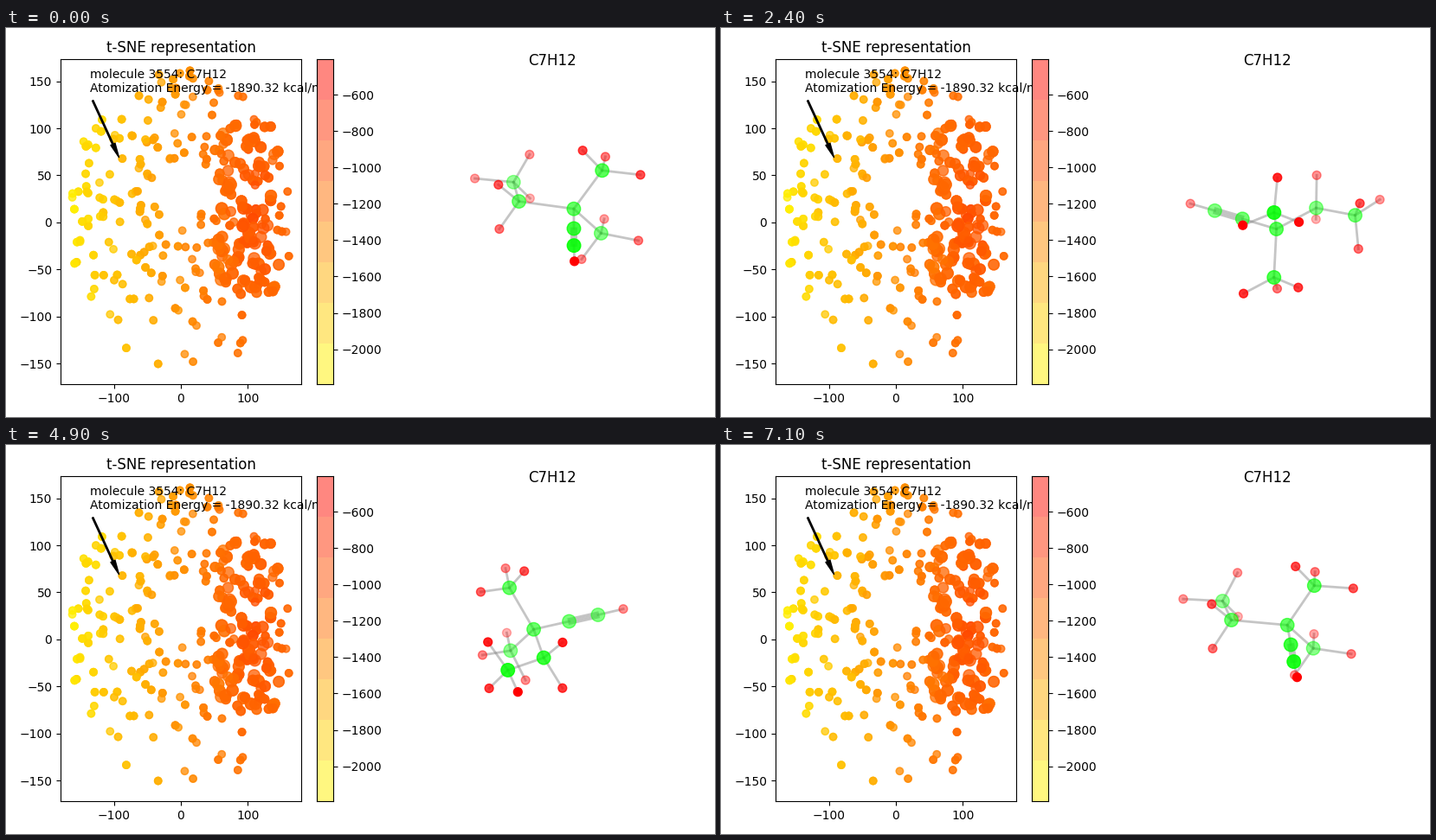
A matplotlib script for the animation above (7200 ms loop, 819 by 450 pixels).

```python
import numpy as np
import matplotlib.pyplot as plt
from matplotlib.animation import FuncAnimation

W, H, FRAMES = 819, 450, 72
plt.rcParams["font.family"] = "DejaVu Sans"
fig = plt.figure(figsize=(W / 100, H / 100), dpi=100, facecolor="white")


def add_axes(left, top, right, bottom):
    """Axes placed by stage pixels, measured from the top left corner."""
    return fig.add_axes(
        [left / W, 1 - bottom / H, (right - left) / W, (bottom - top) / H])


# ---- embedding scatter ----
ax = add_axes(63, 36, 341, 412)
LIMIT_X, LIMIT_Y = 179.4, 172.8
ax.set(xlim=(-LIMIT_X, LIMIT_X), ylim=(-LIMIT_Y + 0.8, LIMIT_Y + 0.8),
       xticks=[-100, 0, 100], yticks=range(-150, 151, 50))
ax.set_title("t-SNE representation")

rng = np.random.default_rng(12)


def crowded(x, y):
    return 55 < x < 145 and -70 < y < 100


def clump_centres(tries=1500):
    """Spaced random centres in an ellipse, packed closer on the right."""
    centres = []
    for _ in range(tries):
        x, y = rng.uniform(-165, 165), rng.uniform(-160, 160)
        dense = crowded(x, y)
        gap = 14 if dense else 19 + 8 * (y < -70)
        inside = np.hypot(x / 165, y / 162) < 1
        hollow = np.hypot(x / 48, (y - 32) / 30) < 1
        if inside and not hollow and all(
                np.hypot(x - a, y - b) > gap for a, b in centres):
            centres.append((x, y))
    return centres


dots = []
for x, y in clump_centres():
    dense = crowded(x, y)
    members = rng.integers(2, 5) if dense else rng.integers(1, 4)
    for dx, dy in rng.normal(0, 4.5, (members, 2)):
        size = rng.uniform(40, 95) if dense else 36
        dots += [(x + dx, y + dy, size)] * rng.integers(2, 6)

x, y, size = np.array(dots).T
dist = np.hypot(x - 112, 0.4 * (y - 10))
green = np.clip(80 + 0.55 * dist + rng.normal(0, 7, len(x)), 0, 255) / 255
ax.scatter(x, y, s=size, alpha=0.5,
           c=np.column_stack([np.ones_like(x), green, 0 * x]))

for dy, label in enumerate(["molecule 3554: C7H12",
                            "Atomization Energy = -1890.32 kcal/mol"]):
    ax.annotate(label, (34, 354 - 16 * dy), xycoords="axes pixels", zorder=5)
ax.annotate("", xy=(-92.3, 69.2), xytext=(-131.4, 129.5), zorder=6,
            arrowprops=dict(facecolor="black", width=1, headwidth=4,
                            headlength=12))

# ---- colour bar ----
bar = add_axes(359, 36, 378, 412)
level = (np.arange(8) + 0.5) / 8
bands = np.column_stack([np.ones(8), 1 - level, np.zeros(8)])[:, None, :]
bar.imshow(bands, origin="lower", aspect="auto", alpha=0.5,
           extent=(0, 1, -2192, -405), interpolation="nearest")
bar.set(xticks=[], yticks=range(-2000, -599, 200))
bar.yaxis.tick_right()

# ---- rotating molecule, positions in stage pixels around the pivot ----
stage = add_axes(0, 0, W, H)
stage.set(xlim=(0, W), ylim=(H, 0))
stage.axis("off")
stage.text(631, 43, "C7H12", fontsize=12, ha="center")

CX, CY, EYE = 635.4, 218.6, 1760
ELEV = np.radians(30)


def mirror(x, y, z):
    return [(x, y, z), (x, y, -z)]


CORE, INNER, TIP, CH2, END, UP, DOWN = range(7)
carbons = [(-19, 20.7, 0), (26.4, 20.3, 0), (64, 20, 0),
           (-35.6, -43.6, 0.6), (-82.8, -51.1, 0.6),
           *mirror(-34.7, 53.5, 42.4)]
# hydrogens come in order of their parents
hydrogens = [(97.6, 20.2, 0), (-91.3, -98, 1),
             *mirror(-97.9, -31.8, 30.2), *mirror(-23.2, -66.8, 29.8),
             *mirror(-20.7, 97.3, 44.2), *mirror(-25.8, 30.5, 73.2),
             *mirror(-68.8, 58.2, 42.5)]
parents = [TIP] + [END] * 3 + [CH2] * 2 + [UP, DOWN] * 3
atoms = np.array(carbons + hydrogens)
n_c, n_h = len(carbons), len(hydrogens)
sizes = np.array([125] * n_c + [50] * n_h)
colors = np.array([(0, 1, 0, 1)] * n_c + [(1, 0, 0, 1)] * n_h, dtype=float)

bonds = [(CORE, a) for a in (INNER, CH2, UP, DOWN)] + [(CH2, END)]
bonds += [(p, n_c + i) for i, p in enumerate(parents)]
strands = [(a, b, 0) for a, b in bonds]
strands += [(INNER, TIP, k) for k in (-2.6, 0, 2.6)]  # triple bond
lines = [stage.plot([], [], color="gray", alpha=0.45, lw=2, zorder=1)[0]
         for _ in strands]
balls = stage.scatter(np.zeros(n_c + n_h), np.zeros(n_c + n_h), s=sizes,
                      c=colors, zorder=2)


def project(azim):
    x, y, z = atoms.T
    side = y * np.cos(azim) - x * np.sin(azim)
    front = x * np.cos(azim) + y * np.sin(azim)
    depth = front * np.cos(ELEV) + z * np.sin(ELEV)
    rise = z * np.cos(ELEV) - front * np.sin(ELEV)
    zoom = 1 / (1 - depth / EYE)
    return np.column_stack([CX + side * zoom, CY - rise * zoom]), depth


def update(frame):
    pos, depth = project(2 * np.pi * frame / FRAMES)
    for line, (a, b, shift) in zip(lines, strands):
        dx, dy = pos[b] - pos[a]
        off = shift * np.array([-dy, dx]) / np.hypot(dx, dy)
        line.set_data(*(pos[[a, b]] + off).T)
    # far atoms are paler and drawn first
    rgba = colors.copy()
    rgba[:, 3] = 0.3 + 0.7 * (depth - depth.min()) / np.ptp(depth)
    order = np.argsort(depth)
    balls.set_offsets(pos[order])
    balls.set_sizes(sizes[order])
    balls.set_facecolor(rgba[order])
    balls.set_edgecolor(rgba[order])
    return [*lines, balls]


anim = FuncAnimation(fig, update, frames=FRAMES, interval=100, repeat=True,
                     repeat_delay=0, blit=False)
plt.show()
```
